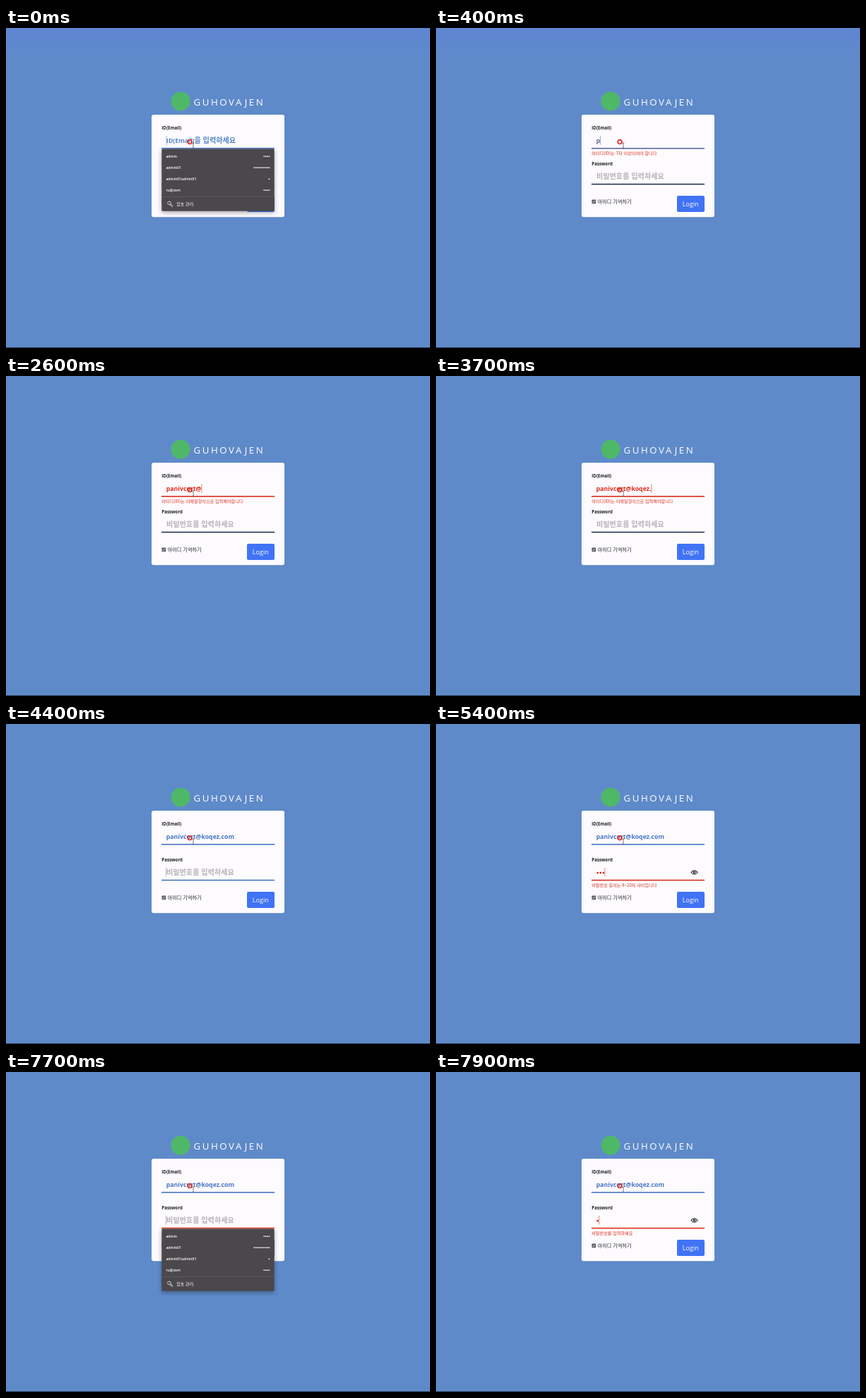
Write an HTML page that moves like this. It is 600 px wide and 454 px high and loops after 8 s.

```html
<!DOCTYPE html>
<html lang="ko">
<head>
<meta charset="utf-8">
<title>Login form</title>
<style>
  html, body { margin: 0; width: 100%; height: 100%; overflow: hidden; background: #5f8aca; }
  svg { display: block; width: 100%; height: 100%; }
  text { font-family: "Open Sans", "Noto Sans CJK KR", "Noto Sans CJK", sans-serif; white-space: pre; }
  .ko { font-family: "Noto Sans CJK KR", "Noto Sans CJK", sans-serif; }
  .label { font-size: 6.2px; font-weight: 700; fill: #1f1f25; }
  .field { font-size: 8.75px; font-weight: 700; }
  .hint { font-size: 10.15px; font-weight: 700; }
  .error { font-size: 6.15px; font-weight: 500; fill: #d82c1a; }
  .row { font-size: 5.1px; font-weight: 600; fill: #fff; }
  .dots { fill: none; stroke-linecap: round; }
  #popup { filter: drop-shadow(0 2px 3px rgba(0, 0, 0, .35)); }
</style>
</head>
<body>
<svg viewBox="0 0 600 454" preserveAspectRatio="none">
  <defs>
    <linearGradient id="sky" x2="0" y2="1">
      <stop stop-color="#5e86d2"/>
      <stop offset="1" stop-color="#5f8aca"/>
    </linearGradient>
  </defs>
  <rect width="600" height="454" fill="#5f8aca"/>
  <rect id="glow" width="600" height="44" fill="url(#sky)"/>
  <rect y="453" width="600" height="1" fill="#2b3546"/>

  <circle cx="247" cy="104" r="13.5" fill="#4fb866"/>
  <text x="265.5" y="109.6" font-size="13.3" font-weight="500" letter-spacing="2.55" fill="#fff">GUHOVAJEN</text>

  <rect x="206" y="123" width="188" height="145.3" rx="3" fill="#fdfbfe"/>
  <text class="label" x="220.3" y="144.4">ID(Email)</text>
  <text class="label" x="220.3" y="195.2">Password</text>

  <text id="idHint" class="field" x="227" y="163.2" fill="#5686c7">ID(Email)<tspan class="ko hint">을 입력하세요</tspan></text>
  <text id="idText" class="field" x="226.7" y="163.2"></text>
  <rect id="idLine" x="220" y="170" width="160" height="1.6"/>
  <text id="idError" class="ko error" x="220.2" y="180"></text>

  <text id="pwHint" class="ko hint" x="226.9" y="213.6" fill="#b4b2b6">비밀번호를 입력하세요</text>
  <path id="pwDots" class="dots" stroke-width="2.8" stroke-dasharray="0 4.1"/>
  <rect id="pwLine" x="220" y="220.8" width="160" height="1.6"/>
  <text id="pwError" class="ko error" x="220.2" y="230.7"></text>
  <g id="eye" fill="none" stroke="#18181c" stroke-width="1.1">
    <path d="M361 210.5Q365.6 205.1 370.2 210.5Q365.6 215.9 361 210.5Z"/>
    <circle cx="365.6" cy="210.5" r="1.3"/>
  </g>
  <rect id="caret" width=".9" height="12.4"/>

  <rect x="220.5" y="243.5" width="5.8" height="5.8" rx=".8" fill="#5b5b60"/>
  <path d="M221.7 246.4L223 247.8L225.2 244.8" fill="none" stroke="#fff" stroke-width=".8"/>
  <text class="ko" x="228.8" y="249.2" font-size="7.1" font-weight="500" fill="#1f1f25">아이디 기억하기</text>
  <rect x="341" y="238" width="39" height="23" rx="2" fill="#4073f5"/>
  <text x="360.4" y="253.2" text-anchor="middle" font-size="9.1" font-weight="500" fill="#fff">Login</text>

  <g id="popup">
    <rect x="220.3" y="171.4" width="159.4" height="88.3" rx="1.5" fill="#4a484b"/>
    <g id="rows"></g>
    <path d="M220.3 239.3H379.7" stroke="#626063" stroke-width=".7"/>
    <g fill="none" stroke="#e4e4e4" stroke-width=".8">
      <circle cx="231" cy="248.3" r="2.3"/>
      <path d="M232.3 249.3L236 252.2L235.2 253.5L231.3 250.5"/>
    </g>
    <text class="ko" x="241.2" y="252" font-size="6.1" font-weight="500" fill="#fff">암호 관리</text>
  </g>

  <circle cx="260.1" cy="161.6" r="2.9" fill="none" stroke="#dd3429" stroke-width="1.7"/>
  <path d="M263.6 163.2H266.4M265 163.2V170.4M263.6 170.4H266.4" fill="none" stroke="#55555a" stroke-width=".8"/>
</svg>
<script>
const $ = id => document.getElementById(id);
const LOOP = 8000;
const BLUE = [70, 118, 194], RED = [219, 44, 28], NAVY = [36, 50, 84];
const EMAIL = "panivcort@koqez.com";
const ID_KEYS = [400, 600, 700, 800, 1000, 1600, 1800, 2000, 2200, 2600,
  3000, 3100, 3300, 3400, 3500, 3700, 3800, 3900, 4000];
const PW_KEYS = [4900, 5100, 5400, 5500, 5600, 5700, 5800, 7900];
const PW_DELETES = [6300, 6800, 7000, 7200, 7300, 7400, 7500];
const PW_FOCUS = 4400, PW_CLEARED = 7500, PW_RETYPED = 7900;
const ID_VALID = 3900, DOT_PITCH = 4.1;

const count = (times, t) => times.filter(time => time <= t).length;
const ramp = (t, start, end) => Math.min(1, Math.max(0, (t - start) / (end - start)));
const mix = (a, b, k) => `rgb(${a.map((v, i) => Math.round(v + (b[i] - v) * k))})`;
const show = (el, visible) => el.style.display = visible ? "" : "none";
const set = (el, attrs) => Object.entries(attrs).forEach(([key, value]) => el.setAttribute(key, value));
const setText = (el, text) => { if (el.textContent !== text) el.textContent = text; };
const dotPath = (x, y, n, pitch) => n ? `M${x} ${y}h${(n - 1) * pitch + .01}` : "";

$("rows").innerHTML = [["admin", 4], ["admin01", 10], ["admin01admin01", 1], ["ru@zom", 4]]
  .map(([name, dots], i) => {
    const y = 183.8 + i * 16;
    return `<text class="row" x="226.4" y="${y}">${name}</text>
      <path class="dots" d="${dotPath(372.4 - (dots - 1) * 2.35, y - 1.6, dots, 2.35)}"
        stroke="#fff" stroke-width="1.7" stroke-dasharray="0 2.35"/>`;
  }).join("");

function drawId(t) {
  const typed = count(ID_KEYS, t);
  const color = t < ID_VALID
    ? mix(BLUE, RED, ramp(t, 350, 650))
    : mix(RED, BLUE, ramp(t, 3850, 4000));
  setText($("idText"), EMAIL.slice(0, typed));
  set($("idText"), { fill: color });
  set($("idLine"), { fill: color });
  show($("idHint"), !typed);
  setText($("idError"), !typed || t >= ID_VALID ? ""
    : typed < 7 ? "아이디(ID)는 7자 이상이어야 합니다"
    : "아이디(ID)는 이메일형식으로 입력해야합니다");
  return color;
}

function drawPassword(t) {
  const typed = count(PW_KEYS, t) - count(PW_DELETES, t);
  const color = t < PW_FOCUS ? mix(NAVY, NAVY, 0) : mix(BLUE, RED, ramp(t, 4850, 5150));
  set($("pwDots"), { d: dotPath(228.7, 211.2, typed, DOT_PITCH), stroke: color });
  set($("pwLine"), { fill: color });
  show($("pwHint"), !typed);
  show($("eye"), typed);
  setText($("pwError"), t < PW_KEYS[0] ? ""
    : t < PW_CLEARED ? "비밀번호 길이는 8~20자 사이입니다"
    : "비밀번호를 입력하세요");
  return { typed, color };
}

function drawPopup(t) {
  const onPassword = t >= PW_CLEARED && t < PW_RETYPED;
  show($("popup"), t < ID_KEYS[0] || onPassword);
  set($("popup"), {
    transform: `translate(0 ${onPassword ? 51 : 0})`,
    opacity: onPassword ? ramp(t, 7400, 7700) : 1
  });
}

function draw(t) {
  const idColor = drawId(t);
  const password = drawPassword(t);
  const onPassword = t >= PW_FOCUS;
  const x = onPassword
    ? 226.2 + password.typed * DOT_PITCH
    : 226.6 + (count(ID_KEYS, t) ? $("idText").getComputedTextLength() : 0);
  set($("caret"), {
    x, y: onPassword ? 203.9 : 153.3,
    fill: onPassword && !password.typed ? "#77777c" : onPassword ? password.color : idColor,
    opacity: .65
  });
  drawPopup(t);
  show($("glow"), t < 1600);
}

const start = performance.now();
function tick() {
  draw((performance.now() - start) % LOOP);
  requestAnimationFrame(tick);
}
tick();
</script>
</body>
</html>
```
